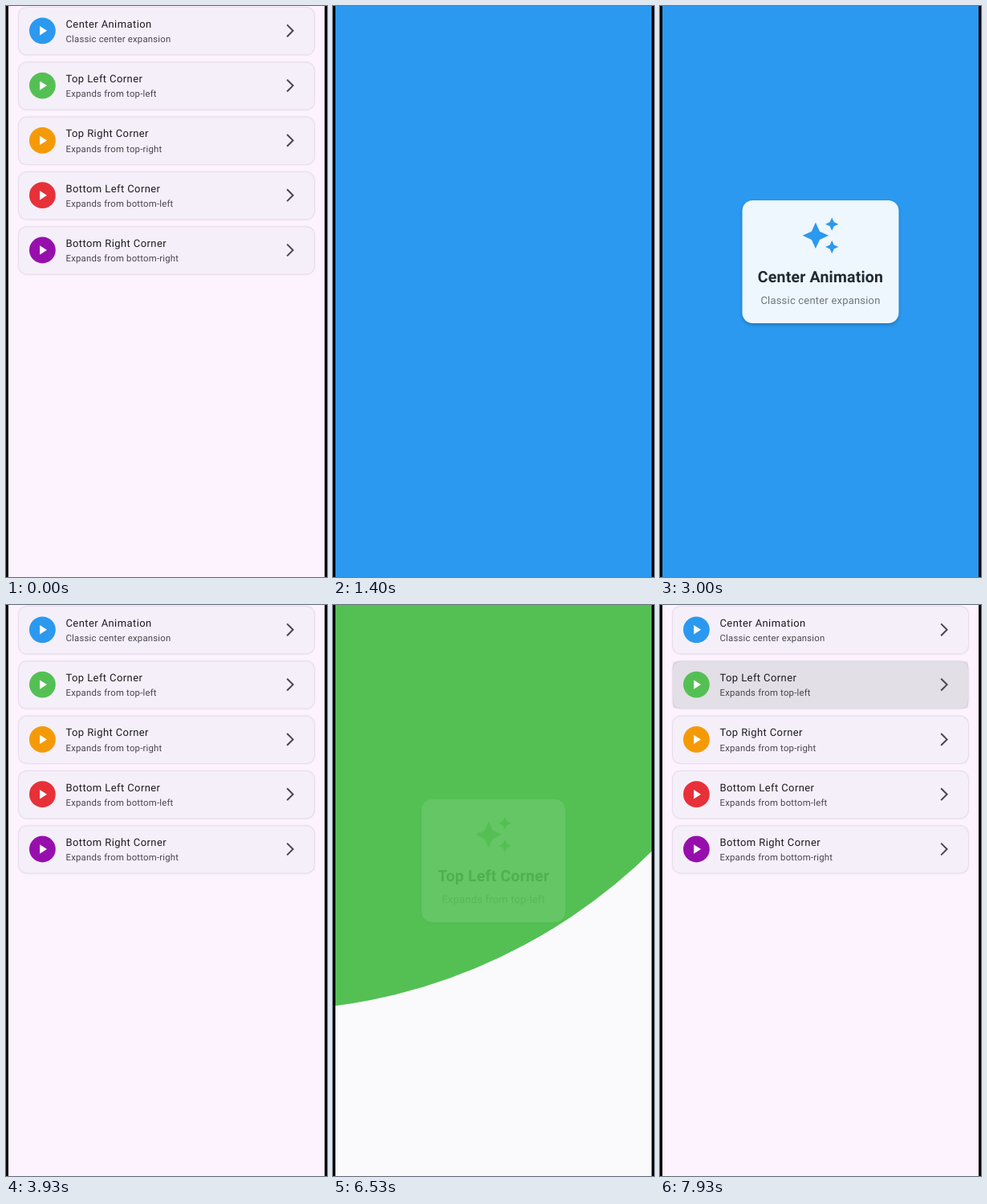
These frames come from a looping animation (400 px wide and 711 px high, 8000 ms). An HTML page:

```html
<!DOCTYPE html>
<html lang="en">
<head>
<meta charset="utf-8">
<title>Circle reveal menu</title>
<style>
  html, body { margin: 0; height: 100%; overflow: hidden; background: #000; }
  svg { display: block; width: 100vw; height: 100vh; }
  text { font-family: Roboto, sans-serif; text-rendering: geometricPrecision; }
  .name { font-size: 13px; letter-spacing: .406px; fill: #1d1b20; }
  .note { font-size: 11.37px; letter-spacing: .203px; fill: #49454f; }
  .tile { fill: #f5eff9; filter: drop-shadow(0 .8px .9px rgba(60, 40, 80, .32)); }
  .press { fill: rgb(60, 80, 60); }
  .card rect { fill: #fff; filter: drop-shadow(0 2px 2px rgba(0, 0, 0, .25)); }
  .card text { text-anchor: middle; letter-spacing: .203px; }
  .head { font-size: 19.5px; font-weight: 700; fill: #212121; }
  .sub { font-size: 13px; fill: #757575; }
</style>
</head>
<body>
<svg id="stage" viewBox="0 0 400 711"></svg>
<script>
const LOOP = 8000, STEP = 1000 / 15;
const items = [
  ['Center Animation', 'Classic center expansion', '#2b99ef'],
  ['Top Left Corner', 'Expands from top-left', '#54c054'],
  ['Top Right Corner', 'Expands from top-right', '#f59a07'],
  ['Bottom Left Corner', 'Expands from bottom-left', '#e73038'],
  ['Bottom Right Corner', 'Expands from bottom-right', '#960fad']
];
// r is the circle's radius after `at` ms
const pages = [
  { item: 0, start: 70, cx: 200, cy: 318.3, r: 243.7, at: 930, width: 195 },
  { item: 1, start: 4530, cx: -89, cy: -189.5, r: 331.5, at: 1337, width: 179 }
];
const SPARKLES = 'M19 9l1.25-2.75L23 5l-2.75-1.25L19 1l-1.25 2.75L15 5l2.75 1.25zM11.5 9.5L9 4 6.5 9.5 1 12l5.5 2.5L9 20l2.5-5.5L17 12z' +
  'M19 15l-1.25 2.75L15 19l2.75 1.25L19 23l1.25-2.75L23 19l-2.75-1.25z';

const tile = ([name, note, color], i) => `
  <g transform="translate(0 ${2 + 68.3 * i})">
    <rect class="tile" x="16" width="368" height="58.5" rx="9.7"/>
    <rect class="press" x="16" width="368" height="58.5" rx="2" opacity="0"/>
    <circle cx="45.4" cy="28.8" r="16.4" fill="${color}"/>
    <path d="M42.1 23.1v11.4l8.9-5.7z" fill="#fff"/>
    <text class="name" x="74.5" y="24.7">${name}</text>
    <text class="note" x="74.5" y="43">${note}</text>
    <path d="M350.2 21.4l7.4 7.4-7.4 7.4" fill="none" stroke="#49454f" stroke-width="2"/>
  </g>`;

const page = ({ item, cx, cy, width }) => {
  const [name, note, color] = items[item];
  return `
  <g class="page">
    <rect x="3" y="-98" width="394" height="832" fill="#faf9fc"/>
    <circle cx="${cx}" cy="${cy}" fill="${color}"/>
    <g class="card">
      <rect x="${200 - width / 2}" y="242" width="${width}" height="153" rx="13"/>
      <path transform="translate(175.65 261.5) scale(2.03)" d="${SPARKLES}" fill="${color}"/>
      <text class="head" x="200" y="343.7">${name}</text>
      <text class="sub" x="200" y="371.3">${note}</text>
    </g>
  </g>`;
};

const stage = document.getElementById('stage');
stage.innerHTML = `<rect x="3" width="394" height="711" fill="#fdf3ff"/>
  ${items.map(tile).join('')}${pages.map(page).join('')}
  <path d="M0 0h3v711H0zM397 0h3v711h-3z"/>`;
const presses = stage.querySelectorAll('.press');
const pageNodes = stage.querySelectorAll('.page');

const ramp = (x, from, to) => Math.min(1, Math.max(0, (x - from) / (to - from)));
const easeOut = x => 1 - (1 - x) ** 3;

function drawPage(p, node, t) {
  const u = t - p.start;
  const enter = ramp(u, -40, 200), leave = ramp(u, 3000, 3300);
  const shown = Math.min(1, enter * 2.2) * (1 - Math.min(1, leave * 1.6));
  const scale = .85 + .15 * easeOut(enter) - .1 * easeOut(leave);
  node.style.display = shown > 0 ? '' : 'none';
  node.setAttribute('opacity', shown);
  node.setAttribute('transform', `translate(200 318) scale(${scale}) translate(-200 -318)`);
  node.querySelector('circle').setAttribute('r', p.r * (Math.max(0, u) / p.at) ** 1.83);
  node.querySelector('.card').setAttribute('opacity', ramp(u, 1800, 3000) ** 1.33);
  // the tile stays pressed while its page is open
  presses[p.item].setAttribute('opacity', .1 * ramp(u, -40, 60) * (1 - ramp(u, 3410, 3560)));
}

function draw(now) {
  // motion advances at 15 steps per second
  const t = Math.floor((now % LOOP + 5) / STEP) * STEP % LOOP;
  pages.forEach((p, i) => drawPage(p, pageNodes[i], t));
}

const begin = performance.now();
function tick() {
  draw(performance.now() - begin);
  requestAnimationFrame(tick);
}
tick();
</script>
</body>
</html>
```
